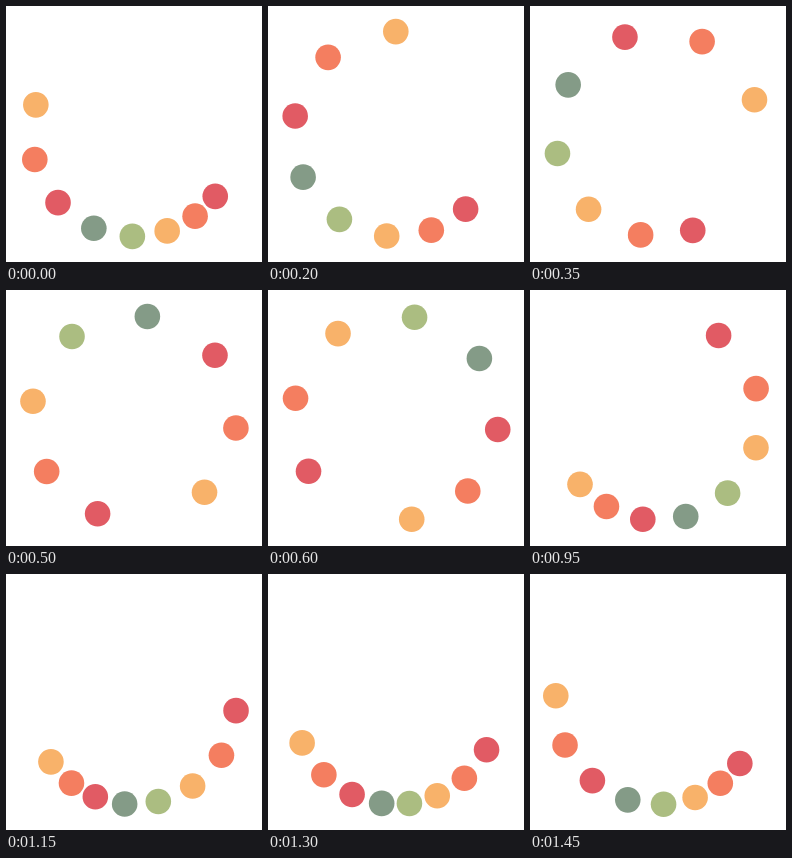
An HTML page with a canvas for the animation above (1500 ms loop, 256 by 256 pixels).

```html
<!DOCTYPE html>
<html lang="en">
<head>
<meta charset="utf-8">
<title>Rolling dots</title>
<style>
  html, body { margin: 0; width: 100%; height: 100%; overflow: hidden; background: #fff; }
  canvas { display: block; width: 256px; height: 256px; }
</style>
</head>
<body>
<canvas id="stage" width="256" height="256"></canvas>
<script>
const ctx = document.getElementById('stage').getContext('2d');

const SIZE = 256, CENTER = SIZE / 2;
const ORBIT = 102.4, DOT = 12.8;
const LOOP = 1500, STEP = 50, LEAD = 62.5;
const START_ANGLE = 37.5, SPACING = 15;
const COLORS = ['#e15b64', '#f47e60', '#f8b26a', '#abbd81', '#849b87'];
const COUNT = 8;

// cubic-bezier(.5, 0, .5, 1), solved by bisection
function ease(x) {
  let low = 0, high = 1;
  for (let i = 0; i < 24; i++) {
    const s = (low + high) / 2;
    if (1.5 * s - 1.5 * s * s + s * s * s < x) low = s;
    else high = s;
  }
  return low * low * (3 - 2 * low);
}

function drawDot(index, time) {
  const progress = ((time + index * LEAD) % LOOP) / LOOP;
  const degrees = START_ANGLE + index * SPACING + 360 * ease(progress);
  const angle = degrees * Math.PI / 180;
  ctx.fillStyle = COLORS[index % COLORS.length];
  ctx.beginPath();
  ctx.arc(CENTER + ORBIT * Math.cos(angle), CENTER + ORBIT * Math.sin(angle), DOT, 0, 2 * Math.PI);
  ctx.fill();
}

function draw(elapsed) {
  // Motion advances in 50 ms steps; the small bias absorbs timer jitter.
  const time = Math.floor((elapsed + 5) / STEP) * STEP % LOOP;
  ctx.fillStyle = '#fff';
  ctx.fillRect(0, 0, SIZE, SIZE);
  for (let i = 0; i < COUNT; i++) drawDot(i, time);
}

const start = performance.now();
function tick() {
  draw(performance.now() - start);
  requestAnimationFrame(tick);
}
tick();
</script>
</body>
</html>
```
